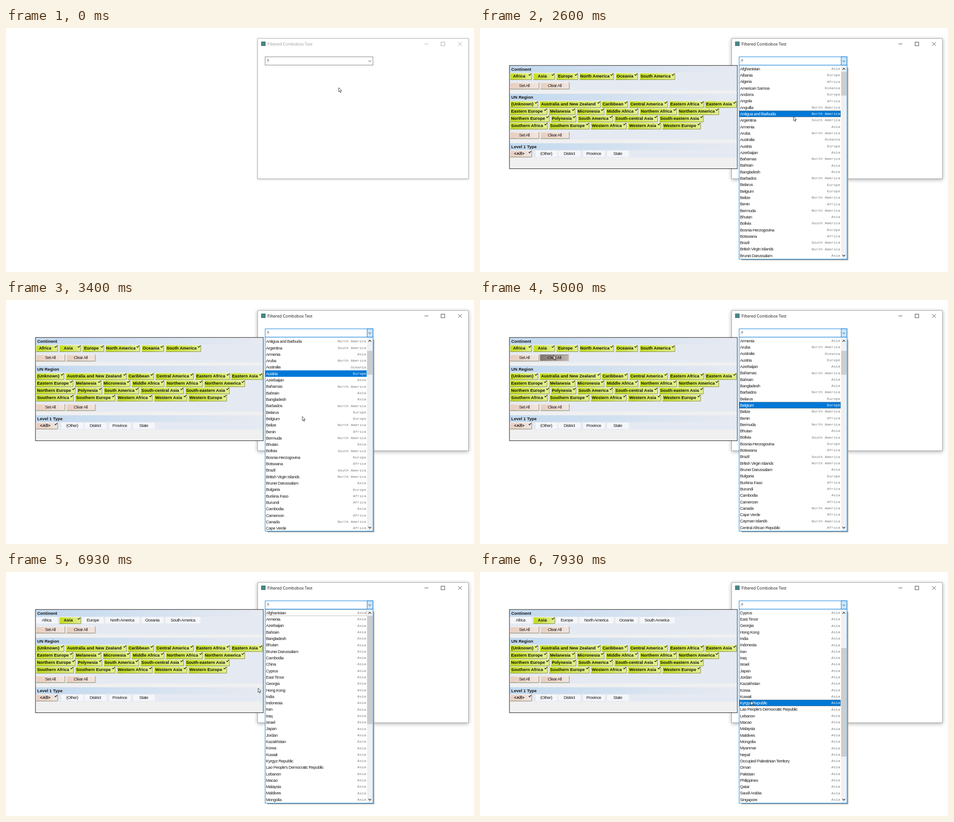
An HTML page for the animation above (8 s loop, 1033x542 px).

```html
<!DOCTYPE html>
<html lang="en">
<head>
<meta charset="utf-8">
<title>Filtered Combobox Test</title>
<style>
html, body { margin: 0; width: 100%; height: 100%; overflow: hidden; background: #fff; }
svg { display: block; width: 100vw; height: 100vh; }
text { font: 9.4px "Liberation Sans", Arial, sans-serif; letter-spacing: -.5px; fill: #1c1c1c; white-space: pre; }
.bold { font-weight: bold; font-size: 9.35px; letter-spacing: .06px; fill: #111; }
.mono { font: 8.08px "Liberation Mono", "Courier New", monospace; letter-spacing: 0; fill: #777; text-anchor: end; }
.title { font: 9.05px "Open Sans", "Noto Sans", sans-serif; letter-spacing: 0; fill: #999; }
.mid { text-anchor: middle; }
.hot text { fill: #fff; }
.line { fill: none; stroke: #646464; }
#frame { fill: #fff; stroke: #b4b4b4; filter: drop-shadow(0 1px 2px rgba(0,0,0,.25)); }
#controls { fill: none; stroke: #999; stroke-width: .85; }
.active #frame { stroke: #a4a4a4; filter: drop-shadow(0 2px 4px rgba(0,0,0,.32)); }
.active #controls { stroke: #222; }
.active .title { fill: #111; }
.chip .on, .chip.set .off { display: none; }
.chip.set .on { display: inline; }
.hover { filter: brightness(.95); }
.lit { stroke: #fff; stroke-opacity: .75; }
.dim { stroke: #777a55; }
.lit, .dim { fill: none; stroke-width: .9; }
.down .face { fill: url(#dark); }
.down .lit { stroke: #665c55; }
.down .dim { stroke: #f4f0ee; }
</style>
</head>
<body>
<svg id="stage" viewBox="0 0 1033 542" preserveAspectRatio="none">
  <defs>
    <linearGradient id="lime"><stop stop-color="#c2dc16"/><stop offset="1" stop-color="#e2ef8e"/></linearGradient>
    <linearGradient id="sand"><stop stop-color="#e8cdbd"/><stop offset="1" stop-color="#f0e5e1"/></linearGradient>
    <linearGradient id="dark"><stop stop-color="#887a70"/><stop offset="1" stop-color="#cbc0b8"/></linearGradient>
    <linearGradient id="head"><stop stop-color="#c2d9ef"/><stop offset="1" stop-color="#e7eaf1"/></linearGradient>
    <clipPath id="drop"><rect id="dropBox" x="566" y="82" width="260"/></clipPath>
    <clipPath id="view"><rect x="572" y="83" width="225" height="430"/></clipPath>
  </defs>
  <g id="win">
    <rect id="frame" x="555.5" y="23.3" width="465.2" height="311.5"/>
    <rect x="563" y="30" width="10" height="10" fill="#4b8585"/>
    <text class="title" x="577" y="39">Filtered Combobox Test</text>
    <g id="controls">
      <path d="M924 35.4h8M998 31.4l8 8m0-8l-8 8"/>
      <rect x="960.3" y="31.3" width="8" height="8"/>
    </g>
  </g>
  <g id="panel"></g>
  <g id="shade">
    <rect id="shadeR" x="811" y="88" width="2" fill="#a4a4a4"/>
    <rect id="shadeB" x="577" width="236" height="2" fill="#a4a4a4"/>
    <rect id="back" x="572" y="83" width="239" fill="#fff"/>
  </g>
  <g id="popup" clip-path="url(#drop)">
    <g id="slide">
      <rect x="572" y="83" width="239" height="431" fill="#fff"/>
      <g clip-path="url(#view)">
        <g id="rows">
          <rect id="mark" x="572.6" width="223.2" height="13.4" stroke-width=".8"/>
          <g id="all"></g>
          <g id="asia"></g>
        </g>
      </g>
      <g id="bar">
        <rect x="797" y="83" width="13" height="430" fill="#f0f0f0"/>
        <rect id="thumb" x="797" width="12" fill="#cdcdcd"/>
        <path d="M800 92.5l3-3 3 3M800 504l3 3 3-3" fill="none" stroke="#444" stroke-width="1.6"/>
      </g>
      <rect id="edge" class="line" x="572" y="82.6" width="238.2" height="430.8"/>
    </g>
  </g>
  <rect id="combo" class="line" x="572" y="64" width="238" height="18.4" style="fill:#fff"/>
  <rect id="arrow" x="797.2" y="64" width="12.8" height="18.4" fill="#cce4f7" stroke="#0078d7"/>
  <path d="M800 72l3 3 3-3" fill="none" stroke="#444"/>
  <text x="575.5" y="76.4">?</text>
  <path id="cursor" d="M0 0V9.4L2.1 7.4 3.7 11 5.1 10.4 3.6 6.9H6.6Z" fill="#fff" stroke="#222" stroke-width=".85"/>
</svg>
<script>
const $ = id => document.getElementById(id);
const ROW = 14.31, TOP = 83.4, FPS = 15, COUNT = 120;

function add(parent, tag, attrs, text) {
  const el = document.createElementNS("http://www.w3.org/2000/svg", tag);
  for (const k in attrs) el.setAttribute(k, attrs[k]);
  if (text) el.textContent = text;
  return parent.appendChild(el);
}
const set = (id, attrs) => { for (const k in attrs) $(id).setAttribute(k, attrs[k]); };
const show = (id, on) => { $(id).style.display = on ? "" : "none"; };
const box = (g, x, y, width, height, fill) => add(g, "rect", { x, y, width, height, fill });

// Filter panel
const panel = $("panel");
box(panel, 65, 83, 503, 229.6, "#f0f0f0");
function section(name, y, end) {
  box(panel, 65, y, 503, 15, "url(#head)");
  box(panel, 65, y + 15, 503, end - y - 15, "#e5eaf2");
  add(panel, "text", { class: "bold", x: 69, y: y + 10.6 }, name);
}
section("Continent", 84, 139);
section("UN Region", 146, 248);
section("Level 1 Type", 256, 288);
const tools = add(panel, "g", { transform: "translate(-.5 .2)" });

function raised(g, x, y, w, fill) {
  box(g, x, y, w, 15, fill).setAttribute("class", "face");
  add(g, "path", { class: "lit", d: `M${x + .5} ${y + 14.5}V${y + .5}H${x + w - 1}` });
  add(g, "path", { class: "dim", d: `M${x} ${y + 14.5}H${x + w - .5}V${y}` });
}
function chip(name, x, end, y, on, fill = "url(#lime)") {
  const g = add(tools, "g", { class: on ? "chip set" : "chip" }), w = end - x, c = x + w / 2;
  const off = add(g, "g", { class: "off" }), lit = add(g, "g", { class: "on" });
  box(off, x, y, w - 1, 14, "#f4f6fa");
  add(off, "text", { class: "mid", x: c - 1, y: y + 10.3 }, name);
  raised(lit, x, y, w, fill);
  add(lit, "text", { class: "bold mid", x: c - 4, y: y + 10.3 }, name);
  add(lit, "path", { d: `M${end - 7} ${y + 3.2}l1.8 2 3.6-4`, fill: "none", stroke: "#111", "stroke-width": 1.3 });
  return g;
}
// Each entry: name, left, right
const chipRow = (y, list, on = true) => list.split(";").map(s => {
  const [name, x, end] = s.split(",");
  return chip(name, +x, +end, y, on);
});
function button(name, x, y) {
  const g = add(tools, "g", {});
  raised(g, x, y, 64, "url(#sand)");
  add(g, "text", { class: "mid", x: x + 31.3, y: y + 10.3 }, name);
  return g;
}
const continents = chipRow(100, "Africa,67,115;Asia,118,166;Europe,169,217;North America,220,296;Oceania,300,349;South America,353,431");
const setAll = button("Set All", 67, 121), clearAll = button("Clear All", 134, 121);
chipRow(162, "(Unknown),67,129;Australia and New Zealand,132,267;Caribbean,269,327;Central America,330,415;Eastern Africa,418,495;Eastern Asia,497,567");
chipRow(178, "Eastern Europe,67,149;Melanesia,152,211;Micronesia,214,275;Middle Africa,278,350;Northern Africa,353,435;Northern America,438,528");
chipRow(194, "Northern Europe,67,154;Polynesia,157,213;South America,216,294;South-central Asia,297,393;South-eastern Asia,396,494");
chipRow(210, "Southern Africa,67,150;Southern Europe,153,242;Western Africa,245,324;Western Asia,327,400;Western Europe,403,488");
button("Set All", 67, 231);
button("Clear All", 134, 231);
chip("<All>", 67, 115, 272, true, "url(#sand)");
chipRow(272, "(Other),123,172;District,174,223;Province,228,277;State,281,330", false);
add(panel, "rect", { class: "line", x: 65, y: 83.2, width: 503, height: 229.4, style: "stroke:#111" });

// Country lists, with the continent as a letter
const ZONES = { A: "Asia", E: "Europe", F: "Africa", O: "Oceania", N: "North America", S: "South America" };
const WORLD = "A Afghanistan,E Albania,F Algeria,O American Samoa,E Andorra,F Angola,N Anguilla,N Antigua and Barbuda,S Argentina,A Armenia,N Aruba,O Australia,E Austria,A Azerbaijan,N Bahamas,A Bahrain,A Bangladesh,N Barbados,E Belarus,E Belgium,N Belize,F Benin,N Bermuda,A Bhutan,S Bolivia,E Bosnia-Herzogovina,F Botswana,S Brazil,N British Virgin Islands,A Brunei Darussalam,E Bulgaria,F Burkina Faso,F Burundi,A Cambodia,F Cameroon,N Canada,F Cape Verde,N Cayman Islands,F Central African Republic".split(",");
const ASIA = "Afghanistan,Armenia,Azerbaijan,Bahrain,Bangladesh,Bhutan,Brunei Darussalam,Cambodia,China,Cyprus,East Timor,Georgia,Hong Kong,India,Indonesia,Iran,Iraq,Israel,Japan,Jordan,Kazakhstan,Korea,Kuwait,Kyrgyz Republic,Lao People's Democratic Republic,Lebanon,Macao,Malaysia,Maldives,Mongolia,Myanmar,Nepal,Occupied Palestinian Territory,Oman,Pakistan,Philippines,Qatar,Saudi Arabia,Singapore".split(",").map(s => "A " + s);
function fillList(id, items) {
  return items.map((s, i) => {
    const g = add($(id), "g", {}), y = TOP + ROW * i;
    add(g, "text", { x: 573.8, y: y + 10.4 }, s.slice(2));
    add(g, "text", { class: "mono", x: 795, y: y + 9.6 }, ZONES[s[0]]);
    return g;
  });
}
const lists = { all: fillList("all", WORLD), asia: fillList("asia", ASIA) };

// Timeline, in steps of 1/15 s
const HOVER = 19, OPEN = 22, READY = 25, PANEL = 27, PRESS = 74, CLEAR = 76, EMPTY = 78, PICK = 82, REFILL = 84;
const WHEEL = [44, 47, 50, 107, 109, 111];
const EASE = [.1, .3, .67, 1];
const PATH = [[0, 734.5, 132.5], [2, 700, 95], [11, 700, 95], [19, 785, 79.5], [25, 785, 79.5], [37, 692, 196.5],
  [39, 692, 196.5], [43, 654, 258.5], [55, 654, 258.5], [58, 580, 238], [66, 106, 125], [68, 106, 125],
  [72, 162, 123], [76, 162, 123], [80, 138, 107], [84, 138, 107], [89, 145, 105], [98, 145, 105],
  [104, 556.5, 258], [107, 620, 270], [114, 620, 270], [119, 597.5, 286.5]];

function cursorAt(n) {
  const i = Math.max(1, PATH.findIndex(k => k[0] >= n));
  const [a, x, y] = PATH[i - 1], [b, u, v] = PATH[i], p = (n - a) / (b - a);
  return [x + (u - x) * p, y + (v - y) * p];
}
const inside = (x, y, l, t, r, b) => x >= l && x < r && y >= t && y < b;

const steps = [];
let hi = -1;
for (let n = 0; n < COUNT; n++) {
  const [x, y] = cursorAt(n), [px, py] = cursorAt(Math.max(0, n - 1));
  const list = n < EMPTY ? "all" : n < REFILL ? "" : "asia";
  const turns = WHEEL.filter(w => w <= n && (list === "asia") === (w >= REFILL));
  const scroll = turns.reduce((s, w) => s + 3 * EASE[Math.min(3, n - w)], 0);
  const target = turns.length * 3;
  if (n === EMPTY) hi = -1;
  if (n >= READY && (x !== px || y !== py) && inside(x, y, 573, 84, 797, 513))
    hi = Math.floor((y - TOP) / ROW + scroll);
  steps.push({ n, x, y, list, scroll, target, hi, moving: Math.abs(scroll - target) > .01 });
}

function draw({ n, x, y, list, scroll, target, hi, moving }) {
  const open = n >= OPEN, ready = n >= READY;
  $("win").classList.toggle("active", open);
  show("panel", n >= PANEL);
  show("shade", open);
  show("popup", open);
  show("arrow", ready);
  $("edge").style.stroke = ready ? "#0078d7" : "";
  $("combo").style.stroke = ready ? "#0078d7" : n < HOVER ? "#7a7a7a" : "#444";

  const p = ready ? 1 : Math.max(0, (n - 21.167) / 3);
  const low = 83 + Math.round(431 * p);
  set("slide", { transform: `translate(0 ${low - 514})` });
  set("dropBox", { height: Math.max(0, ready ? 440 : low - 124) });
  set("back", { height: low - 83 });
  set("shadeR", { height: low - 86 });
  set("shadeB", { y: low });

  const asia = list === "asia", focus = asia && hi < 0;
  show("all", list === "all");
  show("asia", asia);
  show("bar", list);
  set("rows", { transform: `translate(0 ${-scroll * ROW})` });
  set("thumb", { y: 97 + Math.round(target * (asia ? 8.05 : 1.78)), height: asia ? 241 : 53 });
  show("mark", hi >= 0 || focus);
  set("mark", {
    y: TOP + ROW * Math.max(0, hi) + .4,
    fill: focus ? "#fff" : "#0078d7",
    stroke: focus ? "#aaa" : moving ? "#0078d7" : "#4f6676"
  });
  for (const k in lists) lists[k].forEach((g, i) => g.classList.toggle("hot", k === list && i === hi));

  continents.forEach((g, i) => g.classList.toggle("set", n < CLEAR || (i === 1 && n > PICK)));
  continents[1].classList.toggle("hover", n >= 79 && inside(x, y, 118, 100, 166, 115));
  setAll.classList.toggle("hover", inside(x, y, 67, 121, 131, 136));
  clearAll.classList.toggle("hover", inside(x, y, 134, 121, 198, 136));
  const down = n >= PRESS && n < CLEAR;
  clearAll.classList.toggle("down", down);
  clearAll.setAttribute("transform", `translate(${down ? -.8 : 0} 0)`);
  set("cursor", { transform: `translate(${x} ${y})` });
}

let last = -1;
function tick() {
  const n = Math.floor((performance.now() + 4) * FPS / 1000) % COUNT;
  if (n !== last) draw(steps[last = n]);
  requestAnimationFrame(tick);
}
tick();
</script>
</body>
</html>
```
